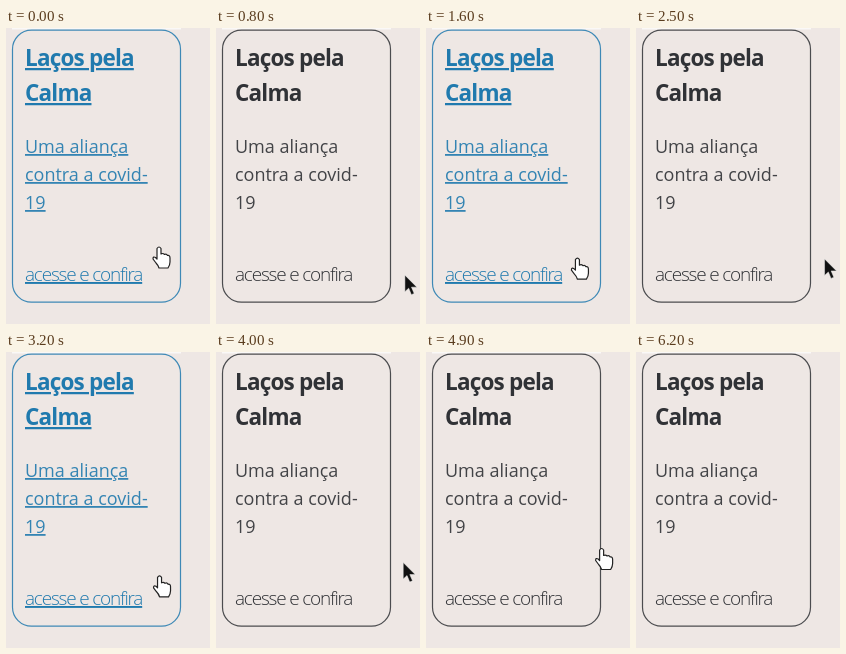
Animation of 204x296 px, one loop 6.4 s. Source, as an HTML page:

```html
<!DOCTYPE html>
<html lang="pt">
<head>
<meta charset="utf-8">
<style>
  html, body { margin: 0; width: 100%; height: 100%; overflow: hidden; background: #eee7e4; }
  svg { display: block; width: 204px; height: 296px; font-family: "Open Sans", "Noto Sans", sans-serif; }
  #card { fill: currentColor; }
  #card rect { fill: none; stroke: currentColor; stroke-width: 1.2; opacity: .85; }
  .title { font-size: 22.5px; font-weight: 700; letter-spacing: -.8px; }
  .body { font-size: 18px; opacity: .9; }
  .more { font-size: 19px; font-weight: 300; letter-spacing: -1.2px; }
  .hover text { text-decoration: underline; text-decoration-thickness: 1px; text-underline-offset: 2px; }
  .hover .title { text-decoration-thickness: 2px; }
</style>
</head>
<body>
<svg viewBox="0 0 204 296">
  <path d="M6 0H175V1.5H6z" fill="#faf8f7"/>
  <g id="card">
    <rect x="6.5" y="2.2" width="168" height="272" rx="19"/>
    <text class="title" x="19" y="38">Laços pela</text>
    <text class="title" x="19" y="73">Calma</text>
    <text class="body" x="19" y="125">Uma aliança</text>
    <text class="body" x="19" y="153">contra a covid-</text>
    <text class="body" x="19" y="181">19</text>
    <text class="more" x="19" y="253">acesse e confira</text>
  </g>
  <g id="pointer" stroke-linejoin="round">
    <path id="arrow" d="M0 0V16.5L3.8 13L6.5 19.5L9.3 18.3L6.6 12H12z" fill="#111" stroke="#eee" stroke-width=".5"/>
    <path id="hand" d="M-2 9V.5Q0-2.5 2 .5V6Q4 4.8 5.5 6.5Q7.5 5.5 8.5 7.5Q11 7 11 10V14Q11 17 9 20H0Q-1 17-3 15L-6 11Q-6 8-3.5 9.5L-2 11z" fill="#fff" stroke="#222" stroke-width="1.2"/>
  </g>
</svg>
<script>
const LOOP = 6400, STEP = 100, HIDE = 6100;
const HOVER_X = 172, HAND_X = 178;
const BLUE = [32, 122, 174], DARK = [48, 50, 54];
// turning points of the pointer: time, x, y
const turns = [
  [0, 153, 220], [900, 190, 248], [1650, 151, 231], [2450, 189, 231],
  [3150, 153, 225], [3800, 190, 211], [4600, 171, 208], [5400, 186, 174]
];
const [card, pointer, arrow, hand] =
  ["card", "pointer", "arrow", "hand"].map(id => document.getElementById(id));
const show = (el, on) => el.style.display = on ? "" : "none";

// swing between neighbouring turning points, slowing at each
function tip(t) {
  const i = Math.max(0, turns.findLastIndex(p => p[0] <= t));
  const [t0, x0, y0] = turns[i], [t1, x1, y1] = turns[i + 1] || [LOOP, x0, y0];
  const k = (1 - Math.cos(Math.PI * Math.max(0, t - t0) / (t1 - t0))) / 2;
  return [x0 + (x1 - x0) * k, y0 + (y1 - y0) * k];
}
const hovered = t => tip(t)[0] < HOVER_X;

function draw(now) {
  const t = Math.floor(now % LOOP / STEP) * STEP;
  const [x, y] = tip(t);
  const blue = (hovered(t) + hovered(t - STEP)) / 2;
  card.style.color = `rgb(${DARK.map((c, i) => c + (BLUE[i] - c) * blue)})`;
  card.classList.toggle("hover", hovered(t));
  pointer.setAttribute("transform", `translate(${x} ${y})`);
  show(pointer, t < HIDE);
  show(hand, x < HAND_X);
  show(arrow, x >= HAND_X);
  requestAnimationFrame(draw);
}
requestAnimationFrame(draw);
</script>
</body>
</html>
```
